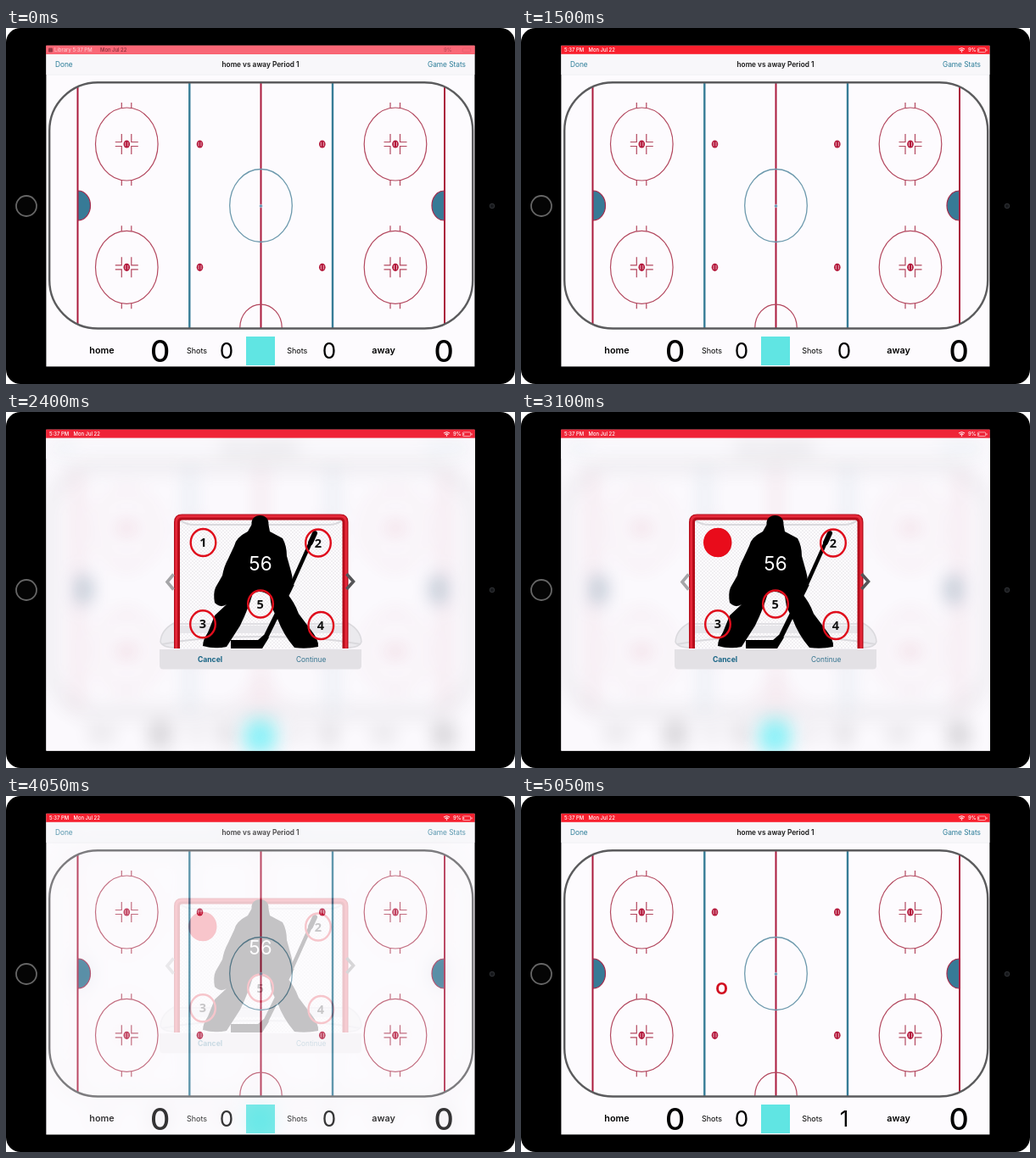
An HTML page for the animation above (5.1 s loop, 600 by 420 pixels).

```html
<!DOCTYPE html>
<html lang="en">
<head>
<meta charset="utf-8">
<title>Hockey shot tracker</title>
<style>
  html, body { margin: 0; width: 100%; height: 100%; overflow: hidden; background: #fff; }
  svg { display: block; width: 600px; height: 420px; }
  text { font-family: Inter, "Liberation Sans", sans-serif; }
  .mid { text-anchor: middle; }
  .end { text-anchor: end; }
  .bold { font-weight: 600; }
  .link { fill: #2a7c98; }
  .line { fill: none; stroke: #b3485f; stroke-width: 1.2; }
  .red { stroke: #ab1a3c; stroke-width: 2; }
  .blue { stroke: #377d97; stroke-width: 2.4; }
  .nav { font-size: 8.3px; }
  .team { font-size: 10.8px; }
  .label { font-size: 9px; }
  .goals { font-size: 36px; font-weight: 500; }
  .shots { font-size: 26px; }
  .status { font-size: 5.9px; font-weight: 500; fill: #fff; }
  .target { fill: none; stroke: #df0d1c; stroke-width: 2.4; }
  .digit { font: 700 14.5px "Open Sans", "Noto Sans", sans-serif; fill: #111; }

  .intro, .modal, .hit, .before, .after { animation: 5100ms infinite both; }
  .intro { animation-name: intro; animation-timing-function: linear; }
  .modal { animation-name: modal; animation-timing-function: ease-in-out; }
  .hit { animation-name: hit; animation-timing-function: step-end; }
  .after { animation-name: after; animation-timing-function: step-end; }
  .before { animation-name: before; animation-timing-function: step-end; }

  @keyframes intro { 0% { opacity: 1; } 5.88%, 100% { opacity: 0; } }
  @keyframes modal {
    0%, 29.41% { opacity: 0; }
    35.29%, 75.49% { opacity: 1; }
    81.37%, 100% { opacity: 0; }
  }
  @keyframes hit { 0% { opacity: 0; } 54.9%, 100% { opacity: 1; } }
  @keyframes after { 0% { opacity: 0; } 82.35%, 100% { opacity: 1; } }
  @keyframes before { 0% { opacity: 1; } 82.35%, 100% { opacity: 0; } }
</style>
</head>
<body>
<svg viewBox="0 0 600 420">
  <defs>
    <clipPath id="screen"><rect x="47.4" y="30.8" width="505" height="368.6"/></clipPath>
    <filter id="soft" filterUnits="userSpaceOnUse" x="0" y="0" width="600" height="420" color-interpolation-filters="sRGB">
      <feGaussianBlur stdDeviation="11"/>
    </filter>
    <pattern id="net" width="4" height="4" patternUnits="userSpaceOnUse">
      <path d="M0 0L4 4M4 0L0 4" stroke="#e4e3e7" stroke-width=".5"/>
    </pattern>
    <g id="dot">
      <ellipse rx="3.8" ry="4.6" fill="#b3173a"/>
      <path d="M-1.5 -2.5V2.5M1.5 -2.5V2.5" stroke="#f3cfd8" stroke-width=".8"/>
    </g>
    <g id="faceoff">
      <ellipse class="line" rx="36.8" ry="43"/>
      <path class="line" d="M-6 -49V-42.5M5.5 -49V-42.5M-6 42.5V49M5.5 42.5V49
        M-13.5 -2.5H-6V-12M13.5 -2.5H5.5V-12M-13.5 2.5H-6V12M13.5 2.5H5.5V12"/>
      <use href="#dot"/>
    </g>
    <path id="crease" d="M0 -17.5A14.5 17.5 0 0 1 0 17.5Z" fill="#377a96" stroke="#a52c4d" stroke-width="1.2"/>
  </defs>

  <!-- tablet -->
  <rect width="600" height="420" rx="17" fill="#000"/>
  <circle cx="24" cy="210" r="12" fill="#050505" stroke="#666" stroke-width="1.8"/>
  <circle cx="573" cy="210" r="2.8" fill="#17191c" stroke="#303236"/>
  <rect x="47.4" y="20.8" width="505" height="378.6" fill="#fdfbfe"/>

  <g id="page">
    <rect x="47.4" y="31" width="505" height="24" fill="#f8f7fa"/>
    <path d="M48 55.2H552" stroke="#ebe9ed" stroke-width=".6"/>
    <text class="nav link" x="58" y="46">Done</text>
    <text class="nav bold mid" x="300" y="46" fill="#161616">home vs away Period 1</text>
    <text class="nav link end" x="542" y="46">Game Stats</text>

    <path class="red" d="M84.5 70V349M517 70V349M300.5 65V354"/>
    <path class="blue" d="M216.3 65V354M385 65V354"/>
    <use href="#crease" x="85" y="209.5"/>
    <use href="#crease" transform="translate(516.5 209.5) scale(-1 1)"/>
    <ellipse cx="300.5" cy="209.5" rx="36.8" ry="43" fill="none" stroke="#6c99ad" stroke-width="1.3"/>
    <circle cx="300.5" cy="210" r="1.8" fill="#5a8fae" stroke="#dce6ed" stroke-width=".6"/>
    <path class="line" d="M275.7 354A24.8 28 0 0 1 325.3 354"/>
    <use href="#faceoff" x="142.3" y="137"/>
    <use href="#faceoff" x="142.3" y="282.3"/>
    <use href="#faceoff" x="459" y="137"/>
    <use href="#faceoff" x="459" y="282.3"/>
    <use href="#dot" x="228.5" y="137"/>
    <use href="#dot" x="228.5" y="282.3"/>
    <use href="#dot" x="372.8" y="137"/>
    <use href="#dot" x="372.8" y="282.3"/>
    <rect x="51.2" y="64.2" width="499" height="290.3" rx="57" fill="none" stroke="#5b5b5d" stroke-width="2.4"/>

    <text class="team bold mid" x="113" y="384">home</text>
    <text class="goals mid" x="181.5" y="394">0</text>
    <text class="label mid" x="225" y="383.5">Shots</text>
    <text class="shots mid" x="260" y="390">0</text>
    <rect x="283" y="364" width="34" height="34" fill="#60e5e3"/>
    <text class="label mid" x="343.3" y="383.5">Shots</text>
    <text class="shots mid before" x="381" y="390">0</text>
    <text class="shots mid after" x="381" y="390">1</text>
    <text class="team bold mid" x="445" y="384">away</text>
    <text class="goals mid" x="516" y="394">0</text>
  </g>
  <text class="mid after" x="236.5" y="233.6" font-size="19" font-weight="700" fill="#d10f20">O</text>

  <!-- status bar -->
  <rect x="47.4" y="20.8" width="505" height="10" fill="#f91f2d"/>
  <rect class="modal" x="47.4" y="20.8" width="505" height="10" fill="#ef2437"/>
  <text class="status" x="51" y="28.3">5:37 PM</text>
  <text class="status" x="79.5" y="28.3">Mon Jul 22</text>
  <g fill="none" stroke="#fff">
    <path d="M516 25.2Q519.5 22.2 523 25.2M517.5 26.7Q519.5 25 521.5 26.7" stroke-width="1.1"/>
    <circle cx="519.5" cy="28" r=".4"/>
    <rect x="538.3" y="23.9" width="9.4" height="4.6" rx="1" stroke-width=".6"/>
    <path d="M539.7 25V27.5M549 25.3V27.2" stroke-width=".8"/>
  </g>
  <text class="status" x="527" y="28.3">9%</text>
  <g class="intro">
    <rect x="47.4" y="20.8" width="505" height="10" fill="#fa6877"/>
    <rect x="50" y="23.5" width="5" height="5" rx="1" fill="#9b3845"/>
    <text class="status" x="57" y="28.3" opacity=".65">Library 5:37 PM</text>
    <text class="status" x="111" y="28.3" style="fill:#85303b">Mon Jul 22</text>
    <text class="status" x="516" y="28.3" style="fill:#b94655">9%</text>
    <rect x="538.3" y="23.9" width="9.4" height="4.6" rx="1" fill="none" stroke="#e15766" stroke-width=".6"/>
  </g>

  <!-- shot picker -->
  <g class="modal">
    <g clip-path="url(#screen)">
      <rect x="47" y="30" width="506" height="370" fill="#fbf9fd"/>
      <use href="#page" filter="url(#soft)" opacity=".48"/>
      <ellipse cx="299" cy="385" rx="15" ry="18" fill="#63f2ff" filter="url(#soft)" opacity=".65"/>
    </g>

    <rect x="201" y="123" width="200" height="156" fill="#fdfcfe"/>
    <rect x="201" y="123" width="200" height="156" fill="url(#net)"/>
    <g fill="none" stroke="#dad9dd">
      <path d="M206 128Q212 133 222 133H380Q390 133 396 128" stroke-width="2"/>
      <path d="M198 249Q183 257 182 271Q184 278 200 278ZM403 249Q418 257 419 271Q417 278 402 278Z" fill="#ebeaee" stroke-width="1.5"/>
      <path d="M204 252H397V261H204Z" fill="#e7e6ea" stroke="none"/>
      <path d="M204 250H397" stroke-width="1.5"/>
      <path d="M184 274Q230 265 300 265T418 274" stroke-width="2"/>
    </g>
    <g fill="none">
      <path d="M201.5 279V130Q201.5 124 207.5 124H394Q400 124 400 130V279" stroke="#b40c1a" stroke-width="7"/>
      <path d="M200.7 279V130Q200.7 123 207.5 123H394Q400.8 123 400.8 130V279" stroke="#e5293a" stroke-width="2.8"/>
    </g>

    <path d="M289.5 133C289 126 293 122 299.5 122S310 126 309.5 133L311 141L326 149Q331 158 331 170
      L336 188Q339 198 337 207L331 214Q340 224 345 238L360 258Q369 269 368 277
      Q354 280 340 278Q327 263 320 244L313 230L311 217Q301 209 291 214L286 229
      Q281 242 276 252L260 277Q246 280 232 276Q232 269 238 260L246 240L260 227
      Q253 232 246 225Q244 214 247 207L255 193Q257 182 262 173L269 158Q271 148 285 141Z" fill="#000"/>
    <path d="M363.5 144L337 203" stroke="#000" stroke-width="4.4" stroke-linecap="round"/>
    <path d="M364 143L359 154" stroke="#000" stroke-width="6" stroke-linecap="round"/>
    <path d="M337 203L304 270" stroke="#000" stroke-width="6"/>
    <path d="M265 269H297L304 263L310 266L302 279H265Z" fill="#000"/>
    <text class="mid" x="300" y="187.3" font-size="22.5" fill="#fff">56</text>

    <ellipse class="target" cx="232.5" cy="154" rx="14.8" ry="16"/>
    <ellipse class="target" cx="368" cy="154.5" rx="14.8" ry="16"/>
    <ellipse class="target" cx="232" cy="250.3" rx="14.8" ry="16"/>
    <ellipse class="target" cx="371.3" cy="252" rx="14.8" ry="16"/>
    <ellipse class="target" cx="300" cy="226.5" rx="14.8" ry="16"/>
    <g class="mid">
      <text class="digit" x="232.5" y="159">1</text>
      <text class="digit" x="368" y="159.7">2</text>
      <text class="digit" x="232" y="255.4">3</text>
      <text class="digit" x="371" y="257">4</text>
      <text class="digit" x="299.7" y="231.6">5</text>
    </g>
    <ellipse class="hit" cx="231" cy="154" rx="16" ry="17" fill="#e90c1b"/>

    <g fill="none" stroke-width="3.6">
      <path d="M197.5 191.5L190 200.5L197.5 209.5" stroke="#a5a5a8"/>
      <path d="M401.5 191L409.5 200L401.5 209" stroke="#555558"/>
    </g>
    <path d="M181 280H419V299Q419 303.5 414.5 303.5H185.5Q181 303.5 181 299Z" fill="#e3e1e5"/>
    <text class="mid" x="240.5" y="295" font-size="8.6" font-weight="700" fill="#176485">Cancel</text>
    <text class="mid" x="359.7" y="295" font-size="8.3" fill="#33738f">Continue</text>
  </g>
</svg>
</body>
</html>
```
